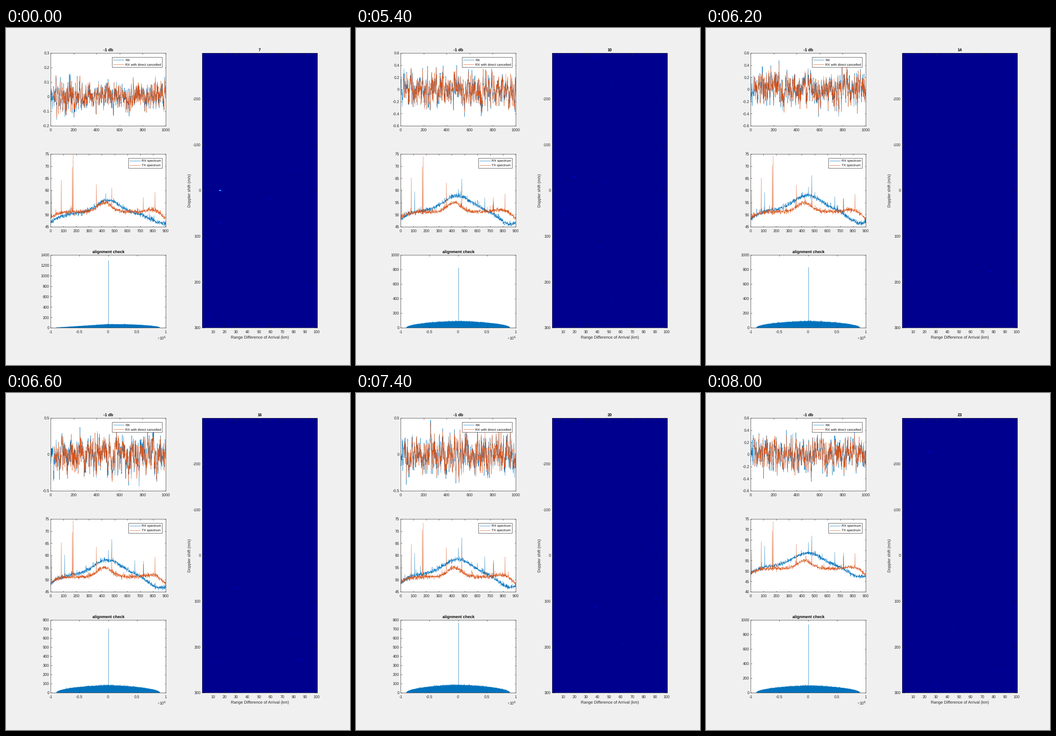
Write a matplotlib script that moves like this. It is 756x741 px and loops after 8.2 s.

```python
import numpy as np
import matplotlib.pyplot as plt
from matplotlib.animation import FuncAnimation
from matplotlib.colors import LinearSegmentedColormap
from matplotlib.patches import Rectangle
from matplotlib.ticker import FormatStrFormatter

W, H = 756, 741
BLUE, ORANGE, INK = "#0072BD", "#D95319", "#262626"
TICK, LABEL, LEGEND = 8.5, 8.96, 7.4
THIN = .5
FIRST, HOLD = 7, 25  # first scan number, ticks it stays on screen

plt.rcParams.update({
    "font.family": "Liberation Sans",
    "text.hinting": "none",
    "axes.unicode_minus": False,
    "axes.linewidth": .7,
    "axes.edgecolor": INK,
})

TX_LINES = {8: 60, 83: 64.5, 170: 70, 176: 74, 358: 63, 478: 61, 725: 57, 816: 59}
RX_LINES = {110: 60, 452: 62, 478: 66, 658: 58, 728: 57}

SAMPLES = np.arange(1000)
BINS = np.arange(901)


def bell(x, center, width):
    return np.exp(-((x - center) / width) ** 2)


def wave_scale(n):
    """Lower limit, upper limit and tick step of the wave plot."""
    if n < 9:
        return (-.2 if n == FIRST else -.3), .3, .1
    if n == 12:
        return -.4, .6, .2
    return (-.5, .5, .5) if n % 4 == 0 else (-.6, .6, .2)


def received(n, rng):
    """Raw wave and the wave after cancelling the direct path."""
    amp = .055 if n == FIRST else .065 if n == 8 else .14
    slow = np.convolve(rng.normal(size=1000), np.hanning(11) / 1.95, "same")
    base = .6 * rng.normal(size=1000) + .8 * slow
    if n == FIRST:
        base *= .85 + .5 * bell(SAMPLES, 150, 110)
    rx = amp * np.clip(base, -3.2, 3.4)
    clean = amp * np.clip(.85 * base + .35 * rng.normal(size=1000), -2.9, 3.1)
    clean[:30] = np.nan
    return rx, clean


def spectrum(base, lines, rng):
    y = base + rng.normal(0, .45, BINS.size)
    y += (rng.random(BINS.size) < .02) * rng.uniform(.6, 2, BINS.size)
    for i, level in lines.items():
        y[i] = level + rng.uniform(-.8, .8)
    return y


def rx_spectrum(n, rng):
    x = BINS
    if n == FIRST:
        base = 51 - 4.3 * np.exp(-x / 90) + 5.1 * bell(x, 450, 120) - 4.5 * bell(x, 890, 160)
        return spectrum(base, {}, rng)
    base = 52 - 4 * np.exp(-x / 70) + 6 * bell(x, 445, 150) - 5.5 * bell(x, 860, 130)
    lines = {i: level + .2 * (n - 16) for i, level in RX_LINES.items()}
    return spectrum(base + .07 * (n - 14), lines, rng)


def tx_spectrum(weak, rng):
    x = BINS
    base = (51.2 - 2.7 * np.exp(-x / 50) - 2.9 * bell(x, 910, 50)
            + 3.8 * bell(x, 420, 75) + .8 * bell(x, 780, 60))
    lines = {i: level - 4 * weak for i, level in TX_LINES.items()}
    return spectrum(base - .7 * weak, lines, rng)


def peak_height(n):
    return np.interp(n, [7, 8, 15, 16, 18, 20, 23],
                     [1295, 822, 835, 703, 630, 768, 940])


def dome(n, rng):
    x = np.linspace(-.9, .9, 900)
    u = np.abs(x) / .9
    if n == FIRST:
        top = 70 * np.where(x < 0, 1 - .95 * u, np.sqrt(1 - u ** 2))
    else:
        top = (35 + .07 * peak_height(n)) * np.sqrt(1 - u ** 1.5)
    top *= .93 + .04 * rng.exponential(size=x.size)
    return np.column_stack([np.r_[-.9, x, .9], np.r_[0, top, 0]])


def doppler_map(n, rng):
    grid = np.zeros((600, 100))
    echoes = [(rng.integers(2, 97), rng.integers(5, 595), .01 + .1 * rng.random() ** 3)
              for _ in range(22)]
    if n == FIRST:
        echoes += [(15, 300, .35), (15, 369, .09)]
    for c, r, level in echoes:
        streak = level * np.array([.35, 1, .5])
        grid[r, c - 1:c + 2] += streak
        grid[r + 1, c - 1:c + 2] += .45 * streak
    return grid


fig = plt.figure(figsize=((W + .01) / 72, (H + .01) / 72), dpi=72, facecolor="#F0F0F0")


def panel(x0, y0, x1, y1, tick=2.5):
    ax = fig.add_axes([x0 / W, 1 - y1 / H, (x1 - x0) / W, (y1 - y0) / H])
    ax.tick_params(direction="in", top=True, right=True, length=tick, width=.7,
                   color=INK, labelcolor=INK, labelsize=TICK)
    ax.tick_params(axis="x", pad=5.7)
    ax.tick_params(axis="y", pad=3)
    for axis in (ax.xaxis, ax.yaxis):
        axis.set_major_formatter(FormatStrFormatter("%g"))
    return ax


wave_ax, spec_ax, align_ax = (panel(98, y, 351, y + 160) for y in (55, 277, 499))
map_ax = panel(431, 55, 684, 659, 6)

wave_ax.set(xlim=(0, 1000), xticks=range(0, 1001, 200))
spec_ax.set(xlim=(0, 900), xticks=range(0, 901, 100))
align_ax.set(xlim=(-1, 1), xticks=[-1, -.5, 0, .5, 1])

rx_line, = wave_ax.plot([], [], color=BLUE, lw=THIN)
clean_line, = wave_ax.plot([], [], color=ORANGE, lw=THIN)
rx_spec, = spec_ax.plot([], [], color=BLUE, lw=THIN)
tx_spec, = spec_ax.plot([], [], color=ORANGE, lw=THIN)
hill, = align_ax.fill([0, 0, 0], [0, 0, 0], color=BLUE, lw=.3)
peak_line, = align_ax.plot([0, 0], [0, 1], color=BLUE, lw=.7)

cmap = LinearSegmentedColormap.from_list(
    "deep", [(0, (0, 0, .5625)), (.3, (0, 0, 1)), (1, (0, 1, 1))])
image = map_ax.imshow(np.zeros((600, 100)), cmap=cmap, vmin=0, vmax=.375,
                      extent=(.5, 100.5, 300, -300), aspect="auto",
                      interpolation="nearest")
map_ax.set(xticks=range(10, 101, 10), yticks=range(-200, 301, 100))

# Pixel-space layer for titles, labels and legends
top = fig.add_axes([0, 0, 1, 1], zorder=5)
top.set(xlim=(0, W), ylim=(H, 0))
top.axis("off")


def put(x, y, s, size=LABEL, color=INK, ha="center", va="baseline", **kw):
    return top.text(x, y, s, fontsize=size, color=color, ha=ha, va=va, **kw)


def title(x, y, s):
    return put(x, y, s, color="black", weight="bold")


def legend(x, y, w, names):
    top.add_patch(Rectangle((x, y), w, 22, fc="white", ec=INK, lw=.7))
    for i, (name, color) in enumerate(zip(names, (BLUE, ORANGE))):
        ly = y + 6 + 10 * i
        top.plot([x + 3, x + 26], [ly, ly], color=color, lw=.7)
        put(x + 29, ly + 3, name, LEGEND, "black", "left")


legend(233, 64, 110, ["RX", "RX with direct cancelled"])
legend(269, 286, 74, ["RX spectrum", "TX spectrum"])
title(225, 51.4, "-1 db")
title(225, 495.4, "alignment check")
scan = title(557.5, 51.4, "")
put(557.5, 683, "Range Difference of Arrival (km)")
put(404, 357, "Doppler shift (m/s)", rotation=90, va="center")
put(332, 685, "×", TICK, "#808080", "left")
put(337.5, 685, "10", TICK, ha="left")
put(347, 682, "6", 6.5, ha="left")


def update(i):
    k = max(0, i - HOLD + 1)
    n = FIRST + k
    rng = np.random.default_rng(100 + n)

    rx, clean = received(n, rng)
    rx_line.set_data(SAMPLES, rx)
    clean_line.set_data(SAMPLES, clean)
    lo, hi, step = wave_scale(n)
    # adding 0 turns a rounded -0 into 0
    wave_ax.set(ylim=(lo, hi), yticks=np.round(np.arange(lo, hi + step / 2, step), 1) + 0.)

    weak = n == 18
    rx_spec.set_data(BINS, rx_spectrum(n, rng))
    tx_spec.set_data(BINS, tx_spectrum(weak, rng))
    lo, hi = (40 if n in (18, 23) else 45), (70 if weak else 75)
    spec_ax.set(ylim=(lo, hi), yticks=range(lo, hi + 1, 5))

    peak = peak_height(n)
    hill.set_xy(dome(n, rng))
    peak_line.set_ydata([0, peak])
    step = 100 if peak < 800 else 200
    hi = int(np.ceil(peak / step)) * step
    align_ax.set(ylim=(0, hi), yticks=range(0, hi + 1, step))

    image.set_data(doppler_map(n, rng))
    scan.set_text(str(n))
    return []


anim = FuncAnimation(fig, update, frames=41, interval=200, repeat=True,
                     repeat_delay=0, blit=False)
plt.show()
```
